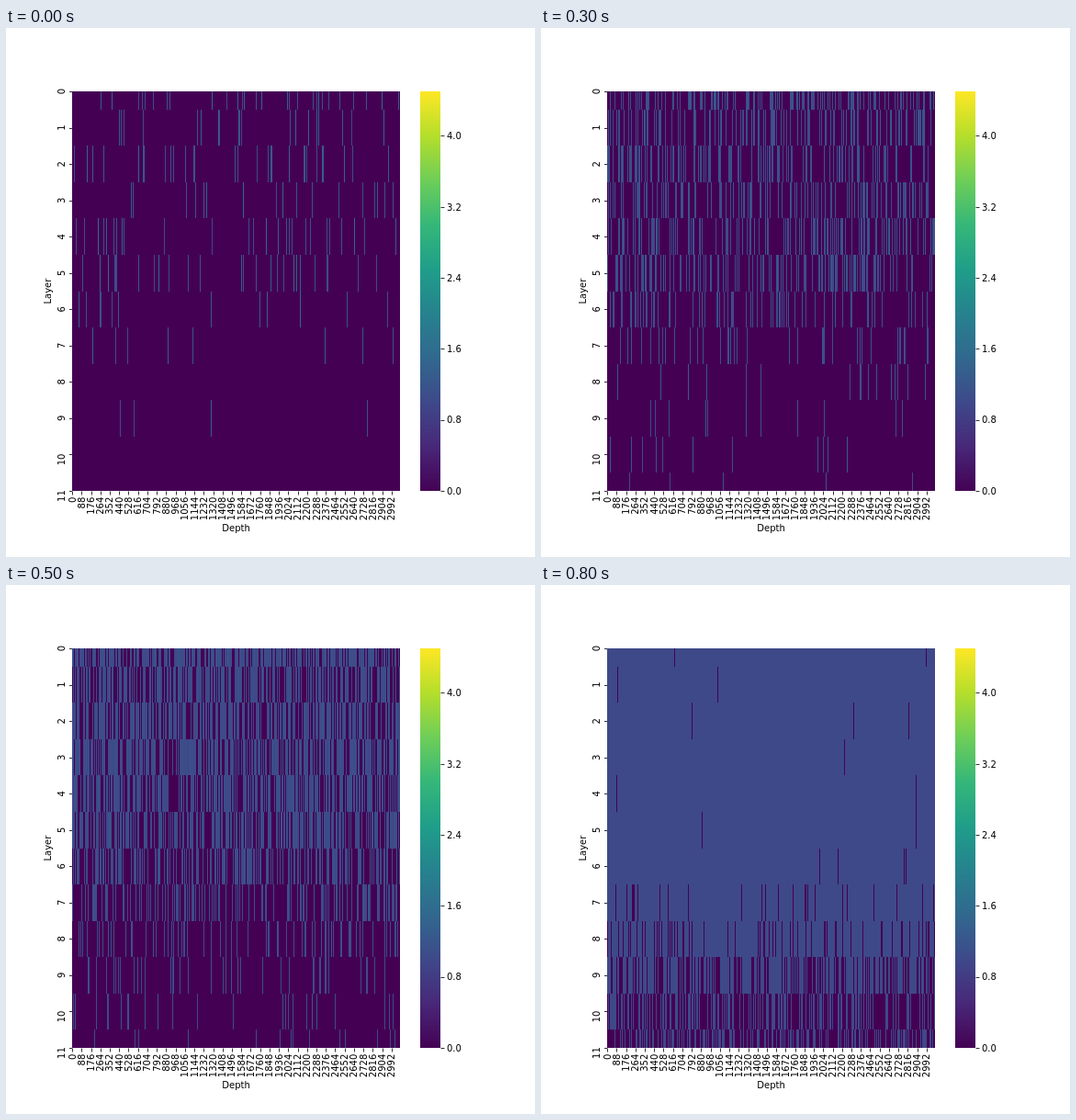
An HTML page with a canvas that plays this animation: 576x576 px, repeating every 0.9 s.

```html
<!DOCTYPE html>
<html lang="en">
<head>
<meta charset="utf-8">
<title>Layer / depth heatmap</title>
<style>
  html, body { margin: 0; width: 100%; height: 100%; overflow: hidden; background: #fff; }
  canvas, svg { position: absolute; left: 0; top: 0; width: 576px; height: 576px; }
  text { font: 10px "DejaVu Sans", sans-serif; fill: #000; }
  path { stroke: #000; stroke-width: 0.8; }
</style>
</head>
<body>
<canvas id="heat" width="576" height="576"></canvas>
<svg id="axes" viewBox="0 0 576 576"></svg>
<script>
const LEFT = 72, TOP = 69.12, WIDTH = 357.12, HEIGHT = 434.88, BOTTOM = TOP + HEIGHT;
const ROWS = 12, DEPTH = 3072, MAX = 4.5;
const PITCH = HEIGHT / (ROWS - 1);
const STEP_MS = 100, STEPS = 9, LAST = STEPS - 1;

// Lone columns that flare up for a single step.
const PEAKS = [
  { step: 2, row: 6, x: 127 },
  { step: 4, row: 0, x: 397 },
  { step: 4, row: 7, x: 80 }
];

const VIRIDIS = ["440154", "482878", "3e4989", "31688e", "26828e", "1f9e89", "35b779", "6ece58", "b5de2b", "fde725"]
  .map(hex => [0, 2, 4].map(i => parseInt(hex.slice(i, i + 2), 16)));

const clamp = (v, low, high) => Math.min(high, Math.max(low, v));

function colour(value) {
  const p = clamp(value / MAX, 0, 0.9999) * (VIRIDIS.length - 1);
  const i = Math.floor(p);
  const mix = VIRIDIS[i].map((c, k) => Math.round(c + (VIRIDIS[i + 1][k] - c) * (p - i)));
  return `rgb(${mix})`;
}

function seeded(seed) {
  return () => {
    seed = (seed + 0x6d2b79f5) | 0;
    let t = Math.imul(seed ^ (seed >>> 15), 1 | seed);
    t ^= t + Math.imul(t ^ (t >>> 7), 61 | t);
    return ((t ^ (t >>> 14)) >>> 0) / 4294967296;
  };
}

// Share of active columns: a logistic rise with a final surge, later and weaker in deep rows.
function density(row, step) {
  const lag = clamp(row - 5, 0, 5);
  const surge = 3 / (1 + lag * lag / 6) * (step / LAST) ** 8;
  return 1 / (1 + Math.exp(2.6 - 0.6 * step + 0.62 * lag - surge));
}

const random = seeded(11);
const rows = Array.from({ length: ROWS }, (_, r) => {
  const y = Math.round(Math.max(TOP, TOP + PITCH * (r - 0.5)));
  const end = Math.round(Math.min(BOTTOM, TOP + PITCH * (r + 0.5)));
  const cells = Array.from({ length: Math.round(WIDTH) }, (_, i) =>
    ({ x: LEFT + i, threshold: random(), glow: random() ** 2 }));
  return { y, height: end - y, cells };
});

const ctx = document.getElementById("heat").getContext("2d");

function fill(value, x, y, width, height) {
  ctx.fillStyle = colour(value);
  ctx.fillRect(x, y, width, height);
}

function drawHeat(step) {
  const spread = 0.5 * (1 - step / LAST);
  rows.forEach(({ y, height, cells }, r) => {
    const share = density(r, step);
    for (const { x, threshold, glow } of cells) {
      fill(threshold < share ? 1 + spread * glow : 0, x, y, 1, height);
    }
  });
  for (const { row, x } of PEAKS.filter(p => p.step === step)) {
    fill(4, x, rows[row].y, 1, rows[row].height);
  }
}

function drawColourBar() {
  for (let y = Math.round(TOP); y < BOTTOM; y++) {
    fill(MAX * (BOTTOM - y - 0.5) / HEIGHT, 451, y, 22, 1);
  }
}

function axesMarkup() {
  let ticks = "", labels = "";
  const pixel = v => Math.round(v) + 0.5;
  const label = (text, x, y, anchor, turned) => {
    const turn = turned ? ` transform="rotate(-90 ${x} ${y})"` : "";
    labels += `<text x="${x}" y="${y}" text-anchor="${anchor}"${turn}>${text}</text>`;
  };
  for (let depth = 0; depth < DEPTH; depth += 88) {
    const x = LEFT + (depth + 0.5) / DEPTH * WIDTH;
    ticks += `M${pixel(x)} 504.5v4`;
    label(depth, Math.round(x + 3.5), 510.7, "end", true);
  }
  for (let r = 0; r < ROWS; r++) {
    const y = TOP + PITCH * r;
    ticks += `M72 ${pixel(y)}h-3`;
    label(r, 64, y + (r > 9 ? 5.5 : 0), "middle", true);
  }
  for (let value = 0; value < MAX; value += 0.8) {
    const y = BOTTOM - value / MAX * HEIGHT;
    ticks += `M473.5 ${pixel(y)}h4`;
    label(value.toFixed(1), 480, Math.round(y + 3.8), "start");
  }
  label("Depth", LEFT + WIDTH / 2, 548, "middle");
  label("Layer", 49, TOP + HEIGHT / 2, "middle", true);
  return `<path d="${ticks}"/>${labels}`;
}

document.getElementById("axes").innerHTML = axesMarkup();
drawColourBar();

let shown = -1;
function tick() {
  const step = Math.floor(performance.now() / STEP_MS) % STEPS;
  if (step !== shown) drawHeat(shown = step);
  requestAnimationFrame(tick);
}
tick();
</script>
</body>
</html>
```
